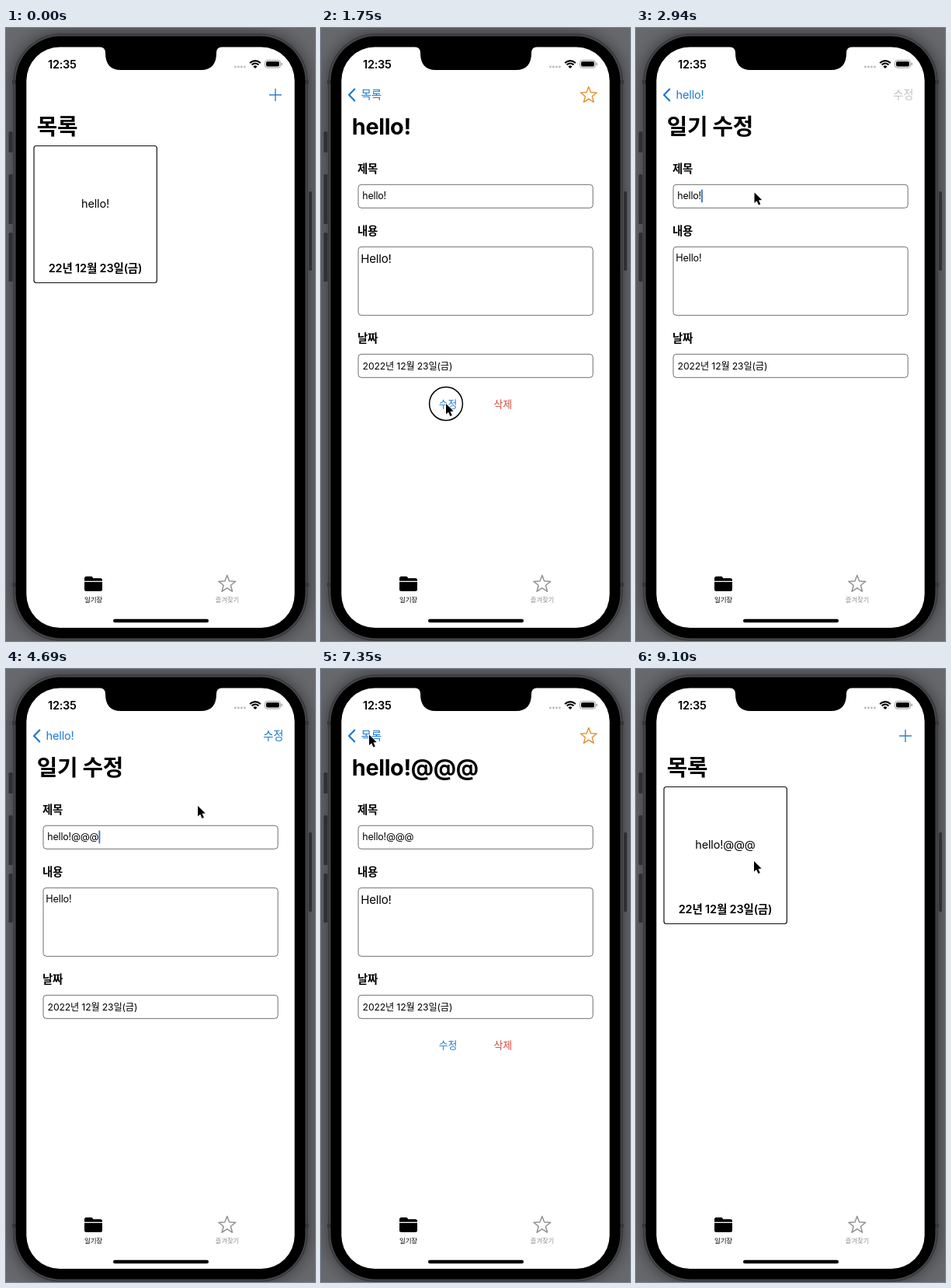
Write an HTML page with a canvas that moves like this. It is 398 by 788 pixels and loops after 9.24 s.

```html
<!DOCTYPE html>
<html lang="ko">
<head>
<meta charset="utf-8">
<title>Diary app</title>
<style>
html, body { margin: 0; width: 100%; height: 100%; overflow: hidden; background: #55565a; }
canvas { display: block; width: 398px; height: 788px; }
</style>
</head>
<body>
<canvas id="stage"></canvas>
<script>
const W = 398, H = 788, LOOP = 9240, STEP = 70;
const FONT = "Inter, 'Noto Sans CJK KR', 'Noto Sans CJK JP', 'Noto Sans CJK', sans-serif";
const BLUE = '#1c7ad2', RED = '#d2463c', ORANGE = '#df8d2b', GRAY = '#939393';
const SCREEN = [26.3, 24.6, 345.4, 746.4, 43], PAGE_W = 346;

const canvas = document.getElementById('stage');
const ctx = canvas.getContext('2d');
const dpr = window.devicePixelRatio || 1;
canvas.width = W * dpr;
canvas.height = H * dpr;

const lerp = (a, b, k) => a + (b - a) * k;
const clamp = k => Math.max(0, Math.min(1, k));
const smooth = k => k * k * (3 - 2 * k);

// Timeline: [start, direction] of each page change, click spans, pointer stops
const moves = [[770, 1], [1820, 1], [5594, -1], [7735, -1]];
const clicks = [[630, 770], [1680, 1820], [2730, 2870], [5390, 5530], [7700, 7770]];
const typed = [3850, 4130, 4340];
const path = [
  [70, 285, 400], [600, 118, 240], [910, 118, 240], [1640, 161, 483],
  [1890, 161, 483], [2660, 152.5, 211.5], [3100, 152.5, 211.5], [3150, 152.5, 212.5],
  [3290, 152.5, 212.5], [3640, 232, 189.5], [4500, 232, 189.5], [5320, 343, 89.5],
  [5740, 343, 89.5], [6460, 266, 182], [7350, 62, 84.5], [8130, 62, 84.5],
  [8610, 77, 214], [8890, 162, 298], [9100, 152, 247]
];

function spring(ms) {
  const w = ms * 0.013;
  return w <= 0 ? 0 : w > 8 ? 1 : 1 - (1 + w) * Math.exp(-w);
}

const depthAt = t => moves.reduce((d, [start, dir]) => d + dir * spring(t - start), 0);

function pointerAt(t) {
  const i = path.findIndex(k => k[0] > t);
  if (i < 0) return path[path.length - 1].slice(1);
  const a = path[i - 1], b = path[i];
  const k = smooth((t - a[0]) / (b[0] - a[0]));
  return [lerp(a[1], b[1], k), lerp(a[2], b[2], k)];
}

function setFont(size, weight = 400) {
  ctx.font = `${weight} ${size}px ${FONT}`;
  ctx.letterSpacing = `${-0.012 * size}px`;
}

function text(str, x, y, size, color = '#000', weight = 400, align = 'left') {
  setFont(size, weight);
  ctx.fillStyle = color;
  ctx.textAlign = align;
  ctx.fillText(str, x, y);
}

function box(x, y, w, h, r, color) {
  ctx.beginPath();
  ctx.roundRect(x, y, w, h, r);
  ctx.fillStyle = color;
  ctx.fill();
}

function frame(x, y, w, h, r, color, width = 1) {
  ctx.beginPath();
  ctx.roundRect(x, y, w, h, r);
  ctx.strokeStyle = color;
  ctx.lineWidth = width;
  ctx.stroke();
}

function line(points, color, width) {
  ctx.beginPath();
  points.forEach(p => ctx.lineTo(...p));
  ctx.strokeStyle = color;
  ctx.lineWidth = width;
  ctx.stroke();
}

function star(x, y, r, color, width) {
  ctx.beginPath();
  for (let i = 0; i < 10; i++) {
    const a = (i / 5 - 0.5) * Math.PI, d = i % 2 ? r * 0.42 : r;
    ctx.lineTo(x + d * Math.cos(a), y + d * Math.sin(a));
  }
  ctx.closePath();
  ctx.strokeStyle = color;
  ctx.lineWidth = width;
  ctx.lineJoin = 'round';
  ctx.stroke();
}

function faded(alpha, draw) {
  if (alpha <= 0) return;
  ctx.save();
  ctx.globalAlpha *= alpha;
  draw();
  ctx.restore();
}

function drawPhone() {
  ctx.fillStyle = '#68696d';
  ctx.fillRect(0, 0, W, H);
  ctx.save();
  ctx.shadowColor = 'rgba(0,0,0,0.55)';
  ctx.shadowBlur = 22 * dpr;
  box(10, 8, 378, 779, 61, '#47484b');
  ctx.restore();
  for (const [y, h] of [[133, 27], [188, 64], [263, 63]]) box(3.5, y, 5, h, 1.5, '#2e2f32');
  box(390, 210, 4, 102, 1.5, '#2e2f32');
  for (const y of [67, 713]) {
    box(8, y, 5, 5, 0, '#36373a');
    box(385, y, 5, 5, 0, '#36373a');
  }
  box(12.5, 10.5, 373, 774, 58, '#000');
  frame(10, 8, 378, 779, 61, '#38393c', 1.5);
}

function drawNotch() {
  ctx.beginPath();
  ctx.moveTo(121, 24);
  ctx.quadraticCurveTo(128, 25, 128, 32);
  ctx.bezierCurveTo(128, 46, 134, 54, 148, 54);
  ctx.lineTo(251, 54);
  ctx.bezierCurveTo(265, 54, 271, 46, 271, 32);
  ctx.quadraticCurveTo(271, 25, 278, 24);
  ctx.fillStyle = '#000';
  ctx.fill();
}

function drawStatus() {
  text('12:35', 54, 51.5, 14.4, '#000', 600);
  for (let i = 0; i < 4; i++) box(294 + i * 4, 48.5, 2.8, 2.8, 1.4, '#b9b9b9');
  ctx.strokeStyle = '#000';
  ctx.lineWidth = 2.1;
  for (const r of [9.4, 6]) {
    ctx.beginPath();
    ctx.arc(321, 51.5, r, -Math.PI * 0.76, -Math.PI * 0.24);
    ctx.stroke();
  }
  ctx.beginPath();
  ctx.moveTo(321, 52);
  ctx.arc(321, 52, 3.6, -Math.PI * 0.76, -Math.PI * 0.24);
  ctx.fillStyle = '#000';
  ctx.fill();
  frame(333.5, 41.5, 20, 9.6, 3, '#9a9a9a', 1);
  box(335, 43, 17, 6.6, 1.8, '#000');
  box(354.6, 44.6, 1.3, 3.4, 0.6, '#9a9a9a');
}

function drawTabs() {
  box(101, 705, 11, 8, 2.5, '#000');
  box(101, 707.3, 23, 16.7, 2.5, '#000');
  ctx.fillStyle = '#fff';
  ctx.fillRect(101, 710.8, 23, 1.3);
  text('일기장', 112.5, 737.6, 8.5, '#000', 500, 'center');
  star(284.8, 715, 11.5, GRAY, 1.5);
  text('즐겨찾기', 285, 737.6, 8.4, GRAY, 400, 'center');
  box(138, 759.7, 123, 4.6, 2.3, '#000');
}

function drawList(s) {
  frame(36, 151.5, 158.3, 176, 3, '#111', 1.2);
  text(s.title, 115, 230.5, 14.5, '#000', 400, 'center');
  text('22년 12월 23일(금)', 115, 313.5, 14.5, '#000', 600, 'center');
}

function drawForm(title, bodySize, bodyY) {
  const rows = [['제목', 186.3, 201, 30], ['내용', 266.3, 281, 88], ['날짜', 404.3, 419, 30]];
  for (const [label, labelY, y, h] of rows) {
    text(label, 47, labelY, 14.4, '#000', 600);
    frame(48, y + 0.3, 302.2, h, 4, '#6f6f6f');
  }
  text(title, 53.3, 220.3, 12.4);
  text('Hello!', 51.2, bodyY, bodySize);
  text('2022년 12월 23일(금)', 53.6, 438.7, 12.2);
}

function drawDetail(s) {
  drawForm(s.title, 15, 302.3);
  text('수정', 163.5, 488, 12.9, BLUE, 400, 'center');
  text('삭제', 234.3, 488, 12.9, RED, 400, 'center');
}

function drawEdit(s) {
  drawForm(s.input, 12.7, 300);
  faded(s.caret, () => {
    setFont(12.4);
    box(53.4 + ctx.measureText(s.input).width, 207.5, 1.8, 17, 0.9, '#2f72bd');
  });
}

const pages = [drawList, drawDetail, drawEdit];

function drawPage(i, dx, s) {
  ctx.save();
  ctx.translate(dx, 0);
  ctx.fillStyle = '#fff';
  ctx.fillRect(26, 24, PAGE_W, 748);
  pages[i](s);
  ctx.restore();
}

function drawRight(i, s) {
  if (i === 0) {
    line([[339, 86], [355, 86]], '#2f7fc6', 1.4);
    line([[347, 78], [347, 94]], '#2f7fc6', 1.4);
  } else if (i === 1) {
    star(344.8, 86.5, 11, ORANGE, 1.3);
  } else {
    text('수정', 344.3, 91, 14.5, s.ready ? BLUE : '#c3c3c3', 400, 'center');
  }
}

function drawNav(depth, s) {
  const titles = ['목록', s.title, '일기 수정'];
  const i = Math.floor(depth), p = depth - i;
  if (i > 0) {
    ctx.save();
    if (p > 0) {
      ctx.beginPath();
      ctx.rect(38.5, 60, 200, 50);
      ctx.clip();
    }
    faded(1 - p, () => text(titles[i - 1], 51.5 - 52 * p, 91, 14.6, BLUE));
    ctx.restore();
  }
  faded(i > 0 ? 1 : p, () => line([[43.8, 78], [36, 86], [43.8, 94]], BLUE, 2.2));

  // The large title shrinks into the next page's back label
  const x = lerp(39.8, 51.5, p), y = lerp(137, 91, p), size = lerp(28.8, 14.6, p);
  const weight = p > 0.97 ? 400 : 700;
  faded(1 - p, () => text(titles[i], x, y, size, '#000', weight));
  faded(p, () => text(titles[i], x, y, size, BLUE, weight));
  if (p > 0) {
    faded(p, () => text(titles[i + 1], 39.8 + PAGE_W * (1 - p), 137, 28.8, '#000', 700));
    faded(2 * p - 1, () => drawRight(i + 1, s));
  }
  faded(1 - p, () => drawRight(i, s));
}

function drawPointer(t) {
  if (t < 70) return;
  const [x, y] = pointerAt(t);
  if (clicks.some(([a, b]) => t >= a && t < b)) {
    ctx.beginPath();
    ctx.arc(x, y, 21.4, 0, 7);
    ctx.strokeStyle = '#000';
    ctx.lineWidth = 1.5;
    ctx.stroke();
  }
  const arrow = [[0, 0], [0, 13.6], [3.1, 10.8], [5.4, 16], [7.8, 15], [5.5, 9.9], [9.6, 9.6]];
  ctx.beginPath();
  arrow.forEach(([ax, ay]) => ctx.lineTo(x + ax, y + ay));
  ctx.closePath();
  ctx.lineJoin = 'round';
  ctx.strokeStyle = '#fff';
  ctx.lineWidth = 1.6;
  ctx.stroke();
  ctx.fillStyle = '#000';
  ctx.fill();
}

function caretAt(t) {
  if (t < 2870 || t >= 5530) return 0;
  const last = [2870, ...typed].filter(k => k <= t).pop();
  return clamp(1 - ((t - last) % 1000 - 420) / 280);
}

function draw(t) {
  const state = {
    title: t < 5590 ? 'hello!' : 'hello!@@@',
    input: 'hello!' + '@'.repeat(typed.filter(k => k <= t).length),
    ready: t >= 3920,
    caret: caretAt(t)
  };
  ctx.setTransform(dpr, 0, 0, dpr, 0, 0);
  drawPhone();
  ctx.save();
  ctx.beginPath();
  ctx.roundRect(...SCREEN);
  ctx.clip();
  const depth = depthAt(t), i = Math.floor(depth), p = depth - i;
  drawPage(i, -0.3 * PAGE_W * p, state);
  if (p > 0) {
    // The page below dims while the next one slides over it
    ctx.fillStyle = `rgba(0,0,0,${0.1 * p})`;
    ctx.fillRect(26, 24, PAGE_W, 748);
    drawPage(i + 1, PAGE_W * (1 - p), state);
  }
  drawNav(depthAt(t - 14), state);
  drawStatus();
  drawTabs();
  ctx.restore();
  drawNotch();
  drawPointer(t);
}

const begin = performance.now();
function tick() {
  const t = (performance.now() - begin) % LOOP;
  draw(Math.floor(t / STEP) * STEP);
  requestAnimationFrame(tick);
}
tick();
</script>
</body>
</html>
```
